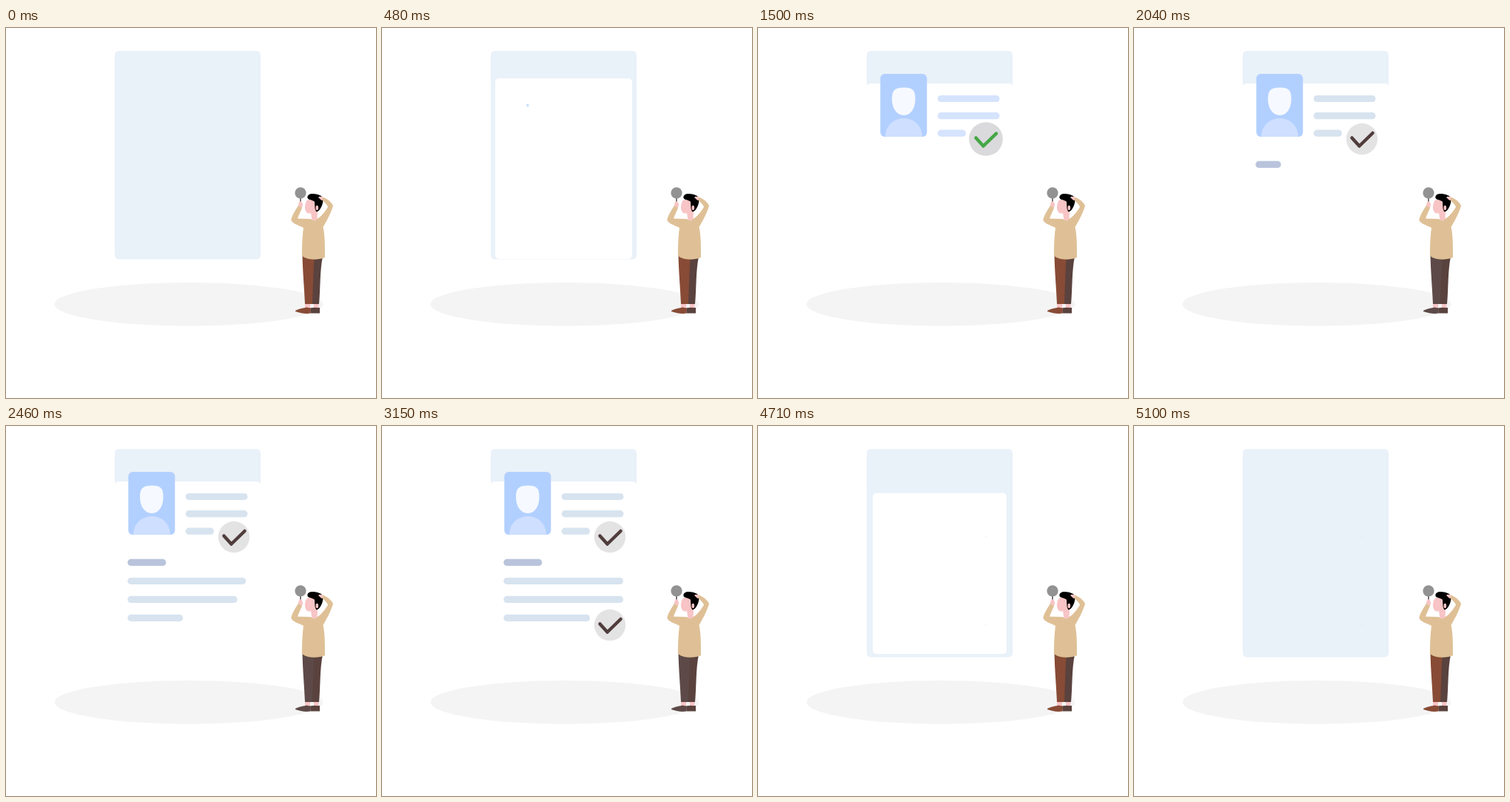
Recreate the animation shown at these times as an HTML page. Size 500 by 500 pixels, loop 5.43 s.

```html
<!DOCTYPE html>
<html lang="en">
<head>
<meta charset="utf-8">
<title>Profile check</title>
<style>
  html, body { margin: 0; width: 100%; height: 100%; overflow: hidden; background: #fff; }
  svg { display: block; width: 100%; height: 100%; }
  .skin { fill: #f8c4c6; }
  .red { fill: #884b35; }
  .dark { fill: #5a423e; }
  .tick { fill: none; stroke-width: 4.5; stroke-linecap: round; stroke-linejoin: round; }
</style>
</head>
<body>
<svg viewBox="0 0 500 500">
  <ellipse cx="247" cy="373.3" rx="181.5" ry="29.3" fill="#f4f4f4"/>
  <rect x="147" y="31" width="197" height="281.5" rx="5.5" fill="#e9f1f9"/>
  <rect id="panel" rx="5" fill="#fff"/>

  <g id="portrait">
    <rect x="165.3" y="62" width="63" height="85" rx="6" fill="#b2d0ff"/>
    <path d="M181 96C181 84 185 80.500 197 80.500S212.500 84 212.500 96C212.500 109 206 118 197 118S181 109 181 96Z" fill="#f6f9ff"/>
    <path d="M172 147C173 113.700 221 113.700 222 147Z" fill="#cfdfff"/>
  </g>
  <g id="bars"></g>
  <g id="badges"></g>

  <g id="man">
    <path class="skin" d="M404 371h7v8h-7ZM416 371h6.500v8h-6.500Z"/>
    <path class="dark" d="M411 378.500C416 377 420 378 424 378V385.500H411.500Z"/>
    <path class="red leg" d="M391 382C396 379 403 378.500 406 377.500L411.500 378.500V385.500C404 387 396 384.500 391 383Z"/>
    <path class="dark" d="M413 309H428C424 328 425 350 423 373H413Z"/>
    <path class="red leg" d="M400.500 307H417C415 328 415 350 414 373H404C403 350 401 330 400.500 307Z"/>
    <path d="M398 229V238" stroke="#777" stroke-width="2"/>
    <circle cx="398" cy="222.800" r="7.600" fill="#929292"/>
    <path class="skin" d="M396 235C399 233 401 236 401 240L399 245L394.500 242Z"/>
    <path class="skin" d="M408 232H421V248L420.500 260H413.500L412 250C407 252 404 248 404 242C404 238 405 234 408 232Z"/>
    <path d="M407.500 230C406 222 419 223 426 227C430 232 428 238 426 242C424 246 421 249 419 248L417.500 244L417 235C415 232 410 233 407.500 230Z"/>
    <ellipse class="skin" cx="420.300" cy="243" rx="1.800" ry="3.200"/>
    <path fill="#dfc096" d="M412 258L394 257.500C396 252 399 246 400 243L395 240C391 246 385 256 385.500 260C387 264 396 267 402 270C400 285 400 298 400 308C408 314 422 314 431 310C431 295 431 280 428.500 269C434 260 440 248 442 240C439 234 432 229 426 228L425 231C431 235 434 239 435 242C431 248 427 254 420.500 258C418 261 415 261 412 258Z"/>
    <path class="skin" d="M422 229C424 226.500 427 228 429 230L426.500 233Z"/>
  </g>
</svg>
<script>
const LOOP = 5430;
const TICK_LENGTH = 41.8;
const $ = s => document.querySelector(s);
const clamp = x => Math.min(1, Math.max(0, x));
const easeOut = p => 1 - (1 - p) ** 3;
const backOut = p => 1 + 3 * (p - 1) ** 3 + 2 * (p - 1) ** 2;
const span = (t, start, length) => clamp((t - start) / length);

function make(parent, tag, attrs) {
  const el = document.createElementNS('http://www.w3.org/2000/svg', tag);
  set(el, attrs);
  return parent.appendChild(el);
}
function set(el, attrs) {
  for (const k in attrs) el.setAttribute(k, attrs[k]);
}

// Each bar: left, right, y, start of growing, start of leaving
const bars = [
  [242.7, 326.5, 95.5, 800, 4390],
  [242.7, 326.5, 118.7, 900, 4300],
  [242.7, 281, 142.2, 1000, 4210],
  [164.3, 216.3, 184.4, 1920, 4020],
  [164.3, 326, 209.5, 2150, 3914],
  [164.3, 326, 234.4, 2235, 3818],
  [164.3, 281, 259.4, 2345, 3722]
].map(([left, right, y, enter, leave], i) => ({
  left, right, enter, leave, title: i === 3,
  el: make($('#bars'), 'rect', { y: y - 4.6, height: 9.2, rx: 4.6 })
}));

// Each badge: y, start of popping in, start of leaving
const badges = [[150, 1140, 4150], [269, 2670, 3720]].map(([y, enter, leave]) => {
  const el = make($('#badges'), 'g', {});
  return {
    el, y, enter, leave,
    disc: make(el, 'circle', { r: 21.2 }),
    tick: make($('#badges'), 'path', { class: 'tick', d: `M294.500 ${y - 1.5}l10 11L322.500 ${y - 8}` })
  };
});

// Panel pose: time, left, top, bottom
const poses = [
  [30, 155, 306, 306], [225, 155, 183, 307], [420, 155, 90, 308],
  [480, 153, 68, 312], [525, 152, 66, 313], [690, 147, 75, 320]
];

function drawPanel(t) {
  const u = t > 3000 ? 5130 - t : t;
  const i = Math.max(1, poses.findIndex(p => p[0] >= u));
  const end = u >= 690 ? 5 : i;
  const a = poses[end - 1], b = poses[end];
  const p = span(u, a[0], b[0] - a[0]);
  const [, left, top, bottom] = a.map((v, k) => v + (b[k] - v) * p);
  set($('#panel'), { x: left, y: top, width: 2 * (245.5 - left), height: bottom - top });
}

function drawBar(b, t, muted) {
  const grow = easeOut(span(t, b.enter, 400));
  const gone = easeOut(span(t, b.leave, 240));
  const full = b.right - b.left;
  const width = full * Math.max(0, grow - gone);
  const titleFill = t < 3720 ? '#b9c4dc' : '#b8cff7';
  set(b.el, {
    x: b.left + full * gone,
    width: width < 0.5 ? 0 : width,
    fill: b.title ? titleFill : muted ? '#d7e3ef' : '#d5e3fd'
  });
}

function drawBadge(b, t, muted) {
  const out = 1 - 0.97 * easeOut(span(t, b.leave, 210));
  const scale = Math.max(0, backOut(span(t, b.enter, 480))) * out;
  const drawn = easeOut(span(t, b.enter + 180, 300)) * TICK_LENGTH;
  set(b.el, { transform: `translate(308 ${b.y}) scale(${t < b.enter ? 0 : scale})` });
  set(b.disc, { fill: muted ? '#e4e3e3' : '#dadadc' });
  set(b.tick, {
    stroke: muted ? '#4f3d3c' : '#45a745',
    'stroke-dasharray': `${drawn} 100`,
    visibility: drawn > 0 && out > 0.04 ? 'visible' : 'hidden',
    transform: `translate(308 ${b.y}) scale(${out}) translate(-308 ${-b.y})`
  });
}

function draw(t) {
  const muted = t >= 1920;
  drawPanel(t);
  const size = easeOut(span(t, 475, 425)) * (1 - easeOut(span(t, 4400, 240)));
  set($('#portrait'), { transform: `translate(196.8 104.5) scale(${size}) translate(-196.8 -104.5)` });
  bars.forEach(b => drawBar(b, t, muted));
  badges.forEach(b => drawBadge(b, t, muted));
  const legFill = t >= 1920 && t < 3720 ? '#5d4a48' : '#884b35';
  document.querySelectorAll('.leg').forEach(el => { el.style.fill = legFill; });
}

const begin = performance.now();
function frame() {
  draw((performance.now() - begin) % LOOP);
  requestAnimationFrame(frame);
}
frame();
</script>
</body>
</html>
```
